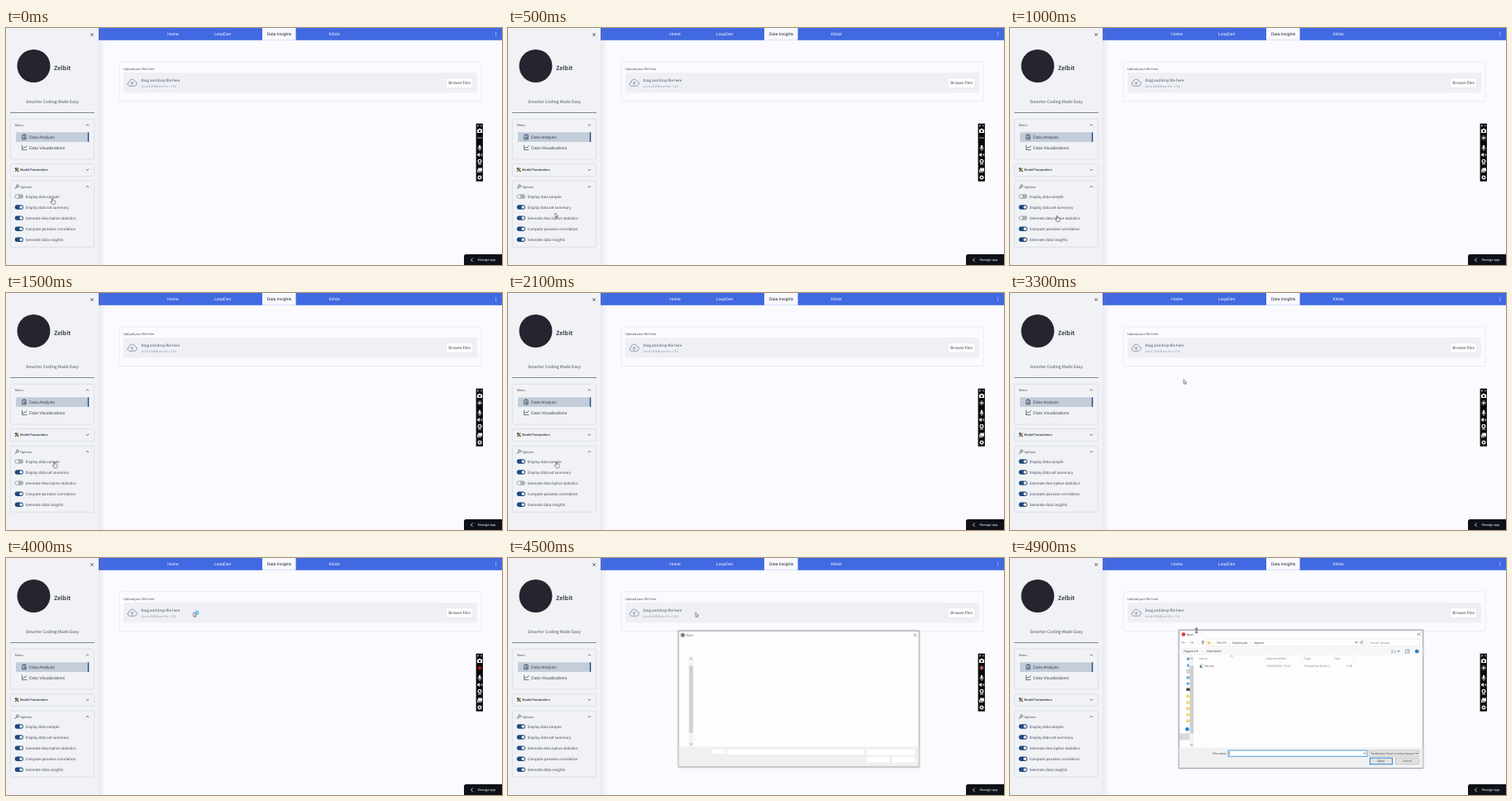
Recreate the animation shown at these times as an HTML page. Size 600x287 px, loop 5 s.

```html
<!DOCTYPE html>
<html lang="en">
<head>
<meta charset="utf-8">
<title>Data insights</title>
<style>
html, body { margin: 0; width: 100%; height: 100%; overflow: hidden; background: #fbfbff; }
svg { display: block; width: 100%; height: 100%; }
text { text-rendering: geometricPrecision; fill: #41444f; }
.ui { font-family: "Noto Sans CJK JP", "Noto Sans CJK SC", Lato, sans-serif; font-size: 4.42px; }
.sm { font-size: 3.85px; }
.nav { font-family: "Liberation Sans", Arial, sans-serif; font-size: 5.1px; }
.nav text { text-anchor: middle; }
.win { font-family: "Open Sans", "Noto Sans", sans-serif; font-size: 3.5px; }
.win text { fill: #333; }
.win .dim { fill: #777; }
.line { fill: none; stroke-linecap: round; stroke-linejoin: round; }
.card { fill: none; stroke: #d6d9e1; stroke-width: .7; }
.dialog { transform-origin: 333px 145px; }

.anim, .show { animation: 5s step-end infinite; }
.cursor { animation-name: move; }
.hand { animation-name: hand; }
.arrow { animation-name: arrow; }
.busy { animation-name: busy; }
.resize { animation-name: resize; }
.sampleOff { animation-name: sampleOff; }
.statsOff { animation-name: statsOff; }
.dots { animation-name: dots; }
.rec { animation-name: rec; }
.dialog { animation-name: open; }
.blank { animation-name: blank; }
.loaded { animation-name: loaded; }

@keyframes move {
  0% { transform: translate(56px, 206px); animation-timing-function: steps(5); }
  10% { transform: translate(57px, 224px); animation-timing-function: steps(3); }
  16%, 20% { transform: translate(57px, 227px); }
  20% { animation-timing-function: steps(4); }
  28%, 34% { transform: translate(58.5px, 204.3px); }
  34% { animation-timing-function: steps(6); }
  46%, 50% { transform: translate(58px, 228px); }
  50% { animation-timing-function: steps(3); }
  56% { transform: translate(152.5px, 227px); animation-timing-function: steps(2); }
  60% { transform: translate(185px, 163px); animation-timing-function: steps(5); }
  70%, 92% { transform: translate(226.7px, 65.7px); }
  92% { animation-timing-function: steps(3); }
  98%, 100% { transform: translate(225.5px, 84.5px); }
}
@keyframes hand { 0% { opacity: 1; } 6% { opacity: 0; } 12% { opacity: 1; } 58%, 100% { opacity: 0; } }
@keyframes arrow { 0% { opacity: 0; } 6% { opacity: 1; } 12% { opacity: 0; } 58% { opacity: 1; } 96%, 100% { opacity: 0; } }
@keyframes busy { 0% { opacity: 0; } 76% { opacity: 1; } 88%, 100% { opacity: 0; } }
@keyframes resize { 0% { opacity: 0; } 96%, 100% { opacity: 1; } }
@keyframes sampleOff { 0% { opacity: 1; } 32%, 100% { opacity: 0; } }
@keyframes statsOff { 0% { opacity: 0; } 18% { opacity: 1; } 50%, 100% { opacity: 0; } }
@keyframes dots { 0% { opacity: 1; } 14%, 100% { opacity: 0; } }
@keyframes rec {
  0% { opacity: 0; color: #e4e4e4; }
  14% { opacity: 1; color: #e4e4e4; }
  76% { opacity: 1; color: #e02028; }
  84% { opacity: 1; color: #e02028; animation-timing-function: steps(6); }
  96%, 100% { opacity: 1; color: #e4e4e4; }
}
@keyframes open {
  0% { opacity: 0; transform: scale(.986); }
  90% { opacity: 1; transform: scale(.986); }
  92%, 100% { opacity: 1; transform: none; }
}
@keyframes blank { 0% { opacity: 1; } 94%, 100% { opacity: 0; } }
@keyframes loaded { 0% { opacity: 0; } 94%, 100% { opacity: 1; } }
</style>
</head>
<body>
<svg viewBox="0 0 600 287" preserveAspectRatio="none">
  <defs>
    <linearGradient id="shade">
      <stop stop-color="#7a7f95" stop-opacity=".14"/>
      <stop offset="1" stop-color="#7a7f95" stop-opacity="0"/>
    </linearGradient>
    <path id="up" class="line" d="M-1.3 .7L0 -.6L1.3 .7" stroke="#41444f" stroke-width=".8"/>
    <path id="down" class="line" d="M-1.3 -.7L0 .6L1.3 -.7" stroke="#41444f" stroke-width=".8"/>
    <path id="cross" class="line" d="M-1.4 -1.4L1.4 1.4M-1.4 1.4L1.4 -1.4"/>
    <g id="on">
      <rect x="10.7" y="-2.7" width="10.2" height="5.4" rx="2.7" fill="#1f4a7d"/>
      <circle cx="18.2" r="1.8" fill="#f4f6fa"/>
    </g>
    <g id="off">
      <rect x="10.4" y="-3" width="10.8" height="6" fill="#f0f2f6"/>
      <rect x="10.7" y="-2.7" width="10.2" height="5.4" rx="2.7" fill="#a9adb8"/>
      <circle cx="13.4" r="1.8" fill="#f4f6fa"/>
    </g>
    <path id="folder" d="M-2 -1.8h1.5l.6 .7h1.9v3h-4z" fill="#f7d36b"/>
    <path id="pointer" d="M0 0V5.3L1.3 4.2L2.1 6.1L2.9 5.7L2.1 3.9H3.7Z" fill="#fff" stroke="#222" stroke-width=".5"/>
  </defs>

  <rect width="600" height="287" fill="#fbfbff"/>

  <!-- Navigation -->
  <g class="nav">
    <rect x="112" width="488" height="14.8" fill="#4169e1"/>
    <rect x="310" width="40.6" height="14.8" fill="#f8f8ff"/>
    <text x="202" y="9.1" style="fill:#fff">Home</text>
    <text x="262" y="9.1" style="fill:#fff">LoopDen</text>
    <text x="330.5" y="9.1" style="fill:#222">Data Insights</text>
    <text x="397" y="9.1" style="fill:#fff">KitVat</text>
    <path class="line" d="M592.7 5.8v0m0 1.8v0m0 1.8v0" stroke="#fff" stroke-width="1"/>
  </g>

  <!-- Sidebar -->
  <rect x="112" width="9" height="287" fill="url(#shade)"/>
  <rect width="112" height="287" fill="#f0f2f6"/>
  <use href="#cross" x="104.2" y="8" stroke="#31333f" stroke-width=".8"/>
  <circle cx="33.5" cy="46" r="20" fill="#25252f"/>
  <g class="ui">
    <text x="58" y="51" font-size="7.1" font-weight="700">Zelbit</text>
    <text x="56" y="90.7" font-size="4.9" font-weight="700" text-anchor="middle" style="fill:#7b7e89">Smarter Coding Made Easy</text>
    <path d="M5 102.5H107" stroke="#84878f" stroke-width="1"/>

    <rect class="card" x="5.3" y="110.3" width="101.4" height="48.7" rx="2"/>
    <text class="sm" x="10.8" y="119">Menu</text>
    <use href="#up" x="98.5" y="117.3"/>
    <rect x="12" y="126.3" width="88" height="11.6" fill="#c3ccd9"/>
    <rect x="98.9" y="126.3" width="1.4" height="11.6" fill="#1f4a7d"/>
    <g class="line" stroke="#31435c" stroke-width=".7">
      <path d="M20 129.7h4.2v5.3h-4.2zM21.2 129.7v-.8h1.8v.8M21.2 133.7v-1M22.2 133.7v-2.2M23.2 133.7v-1.5"/>
      <path d="M19.5 142.2v5.3h5.5M20.6 145.8l1.5-1.8l1.2 1l1.7-2.3"/>
    </g>
    <g class="nav">
      <text x="28" y="133.9" style="text-anchor:start">Data Analysis</text>
      <text x="28" y="146.8" style="text-anchor:start">Data Visualizations</text>
    </g>

    <rect class="card" x="5.3" y="164.5" width="101.4" height="15" rx="2"/>
    <path class="line" d="M11.6 170l3.4 3.6M11.2 170.6l1.2-1.2" stroke="#444" stroke-width="1.3"/>
    <path class="line" d="M14.8 170l-3.4 3.6" stroke="#9a7040" stroke-width="1.4"/>
    <text x="17" y="173.4" font-size="3.8" font-weight="700">Model Parameters</text>
    <use href="#down" x="98.5" y="171.9"/>

    <rect class="card" x="5.3" y="185" width="101.4" height="80.3" rx="2"/>
    <path class="line" d="M11.2 194.4l1.7-1.8" stroke="#444" stroke-width="1"/>
    <circle cx="14" cy="191.4" r="1.5" fill="#c8dcec" stroke="#444" stroke-width=".6"/>
    <text class="sm" x="17" y="193.6">Options</text>
    <use href="#up" x="98.5" y="192"/>

    <use href="#on" y="204"/><text x="23.4" y="205.6">Display data sample</text>
    <use href="#on" y="217"/><text x="23.4" y="218.7">Display data set summary</text>
    <use href="#on" y="230.1"/><text x="23.4" y="231.8">Generate descriptive statistics</text>
    <use href="#on" y="243.2"/><text x="23.4" y="244.9">Compute pairwise correlation</text>
    <use href="#on" y="256.3"/><text x="23.4" y="258">Generate data insights</text>
    <g class="show sampleOff"><use href="#off" y="204"/></g>
    <g class="show statsOff"><use href="#off" y="230.1"/></g>
  </g>

  <!-- Uploader -->
  <g class="ui">
    <rect class="card" x="137" y="40.8" width="438" height="47.8" rx="2" style="stroke:#e3e5ec"/>
    <text class="sm" x="142" y="50.7">Upload your file here</text>
    <rect x="142" y="54" width="428" height="24.6" rx="2" fill="#eef0f6"/>
    <g class="line" stroke="#8a8f9f" stroke-width=".9">
      <path d="M149.6 70.2C146.3 70 146.3 65.8 149.2 65.5C149.4 61.3 155 61.2 155.7 64.5C159.3 64.6 159.3 70 155.8 70.2Z"/>
      <path d="M152.6 68.6V65.8M151.2 67l1.4-1.4l1.4 1.4"/>
    </g>
    <text x="163.4" y="64.8">Drag and drop file here</text>
    <text x="163.4" y="72.4" font-size="3.6" style="fill:#9699a4">Limit 200MB per file • CSV</text>
    <rect x="532.3" y="60.4" width="32.6" height="12.2" rx="1.8" fill="#fff" stroke="#dcdfe6" stroke-width=".6"/>
    <text x="548.6" y="68.2" font-size="4.8" text-anchor="middle">Browse files</text>
  </g>

  <!-- Manage app -->
  <path d="M554 287V276.5Q554 274 556.5 274H600V287Z" fill="#0e1117"/>
  <path class="line" d="M564.3 278.9l-1.8 1.9l1.8 1.9" stroke="#fff" stroke-width=".8"/>
  <text class="ui" x="570.5" y="282.4" style="fill:#fff;font-size:3.85px">Manage app</text>

  <!-- File dialog -->
  <g class="win anim dialog">
    <rect x="204.3" y="87.3" width="295.4" height="167" fill="#fdfdfd" stroke="#8a8a8a" stroke-width=".7" style="filter:drop-shadow(0 .6px 1.2px #0005)"/>
    <rect x="204.7" y="229.6" width="294.6" height="24.4" fill="#f0f0f0"/>
    <text x="213.6" y="93.9">Open</text>
    <use href="#cross" x="494.6" y="92.4" stroke="#444" stroke-width=".55"/>
    <rect x="217.3" y="118" width="5" height="111" fill="#f3f3f3"/>
    <rect x="217.5" y="130.5" width="4.6" height="82" fill="#cfcfcf"/>
    <use href="#up" x="219.8" y="121.5" opacity=".7"/>
    <use href="#down" x="219.8" y="226.5" opacity=".7"/>

    <g class="show blank">
      <circle cx="209.6" cy="92.6" r="2.5" fill="#777"/>
      <path d="M244.5 232.8h17.5v6h-17.5zM263.5 232.5h168.5v7.5h-168.5zM435 232.5h60v7.5h-60zM435 241.5h29v8h-29zM466 241.5h29v8h-29z" fill="#fff" stroke="#e2e2e2" stroke-width=".4"/>
    </g>

    <g class="show loaded">
      <circle cx="209.9" cy="92.5" r="2.3" fill="#d93b30"/>
      <g class="line" stroke="#999" stroke-width=".6">
        <path d="M212 102.5h-4m1.5-1.5l-1.5 1.5l1.5 1.5M217.5 102.5h4m-1.5-1.5l1.5 1.5l-1.5 1.5"/>
        <path d="M233.3 104.5v-4m-1.5 1.5l1.5-1.5l1.5 1.5" stroke="#333"/>
      </g>
      <path d="M237.5 98.2h192.5v8.6h-192.5zM433 98.2h62.5v8.6h-62.5z" fill="#fff" stroke="#d9d9d9" stroke-width=".5"/>
      <use href="#folder" x="241" y="102.5"/>
      <text x="245.5" y="103.7">›</text><text x="250" y="103.7">This PC</text>
      <text x="265" y="103.7">›</text><text x="269" y="103.7">Downloads</text>
      <text x="290.5" y="103.7">›</text><text x="295" y="103.7">dataset</text>
      <use href="#down" x="419" y="102.5"/>
      <path class="line" d="M426.7 101.6a1.6 1.6 0 1 0 .2 1.4m-.1-2.5v1.2h-1.2" stroke="#555" stroke-width=".5"/>
      <text class="dim" x="435.5" y="103.7">Search dataset</text>

      <rect x="204.7" y="108.5" width="294.6" height="9.2" fill="#f5f6f7"/>
      <text x="210" y="114.4">Organise ▾</text>
      <text x="238" y="114.4">New folder</text>
      <path d="M461.5 111.5h1.4v1.2h-1.4zm0 2.2h1.4v1.2h-1.4zm2.4-2h3v.6h-3zm0 2.3h3v.6h-3z" fill="#6890ba"/>
      <use href="#down" x="470" y="113"/>
      <path d="M478.5 111h4.5v4h-4.5zM481.3 111v4" fill="#fff" stroke="#567" stroke-width=".5"/>
      <circle cx="492.2" cy="113" r="2.3" fill="#1573c4"/>
      <text x="492.2" y="114.3" text-anchor="middle" style="fill:#fff">?</text>

      <g fill="#4a94df">
        <path d="M215.5 119.8l.7 1.5l1.6 .2l-1.2 1.1l.3 1.6l-1.4-.8l-1.4 .8l.3-1.6l-1.2-1.1l1.6-.2z"/>
        <path d="M214.7 128h1.6v2h1.2l-2 2.2l-2-2.2h1.2z"/>
        <path d="M213.8 135.3h3.2v4h-3.2z" fill="#dfe7ef" stroke="#789" stroke-width=".4"/>
        <path d="M213.3 143.2h4.2v3.4h-4.2z" fill="#7fb7db"/>
        <circle cx="215.2" cy="152" r="1.6"/>
        <path d="M213.3 157.5h4.2v3.4h-4.2z" fill="#444"/>
        <circle cx="214.4" cy="207.3" r="2.2" fill="#2478cc"/>
      </g>
      <use href="#folder" x="215.4" y="167"/>
      <use href="#folder" x="215.4" y="174.5"/>
      <use href="#folder" x="215.4" y="182"/>
      <use href="#folder" x="215.4" y="189.5"/>
      <use href="#folder" x="215.4" y="197"/>
      <rect x="205" y="212.5" width="12.2" height="8" fill="#d9d9d9"/>

      <path d="M308 119v7M354 119v7M391 119v7M416 119v7" stroke="#e2e2e2" stroke-width=".5"/>
      <use href="#up" x="268" y="118.8" opacity=".5"/>
      <text class="dim" x="229" y="123.4">Name</text>
      <text class="dim" x="310.5" y="123.4">Date modified</text>
      <text class="dim" x="356" y="123.4">Type</text>
      <text class="dim" x="393" y="123.4">Size</text>
      <path d="M230.3 128.8h3.2v4.4h-3.2z" fill="#fff" stroke="#888" stroke-width=".4"/>
      <rect x="229.6" y="130.2" width="2.4" height="2.3" fill="#2f8a57"/>
      <text x="236" y="132.3">bis.csv</text>
      <text class="dim" x="310.5" y="132.3">10/05/2024 15:24</text>
      <text class="dim" x="356" y="132.3" font-size="3.4">Tamberlow Sheet C...</text>
      <text class="dim" x="414" y="132.3" text-anchor="end">1 KB</text>

      <text x="262" y="238" text-anchor="end">File name:</text>
      <rect x="264" y="233" width="168" height="7.2" fill="#fff" stroke="#0078d7" stroke-width=".7"/>
      <path d="M265.6 234.3v4.6" stroke="#222" stroke-width=".4"/>
      <use href="#down" x="429" y="236.7"/>
      <rect x="434.8" y="233" width="59.5" height="7.2" fill="#e4e4e4" stroke="#aaa" stroke-width=".5"/>
      <text x="436.3" y="238" font-size="3.4">Tamberlow Sheet Comma Separa</text>
      <use href="#down" x="491.8" y="236.7"/>
      <rect x="435.5" y="242.2" width="27" height="7.6" fill="#e1e1e1" stroke="#0078d7" stroke-width=".8"/>
      <rect x="466.3" y="242.2" width="28" height="7.6" fill="#e1e1e1" stroke="#aaa" stroke-width=".5"/>
      <text x="449" y="247.3" text-anchor="middle">Open</text>
      <text x="480.3" y="247.3" text-anchor="middle">Cancel</text>
    </g>
  </g>

  <!-- Recorder strip -->
  <rect x="568.6" y="115.7" width="8.3" height="70" fill="#080808"/>
  <g fill="#f2f2f2">
    <path d="M570.2 117.4h1.8v.9h-.9v1.2h-.9zM574 118h1.8v.8h-1.8z"/>
    <path d="M569.9 122.7h1.6l.6-1h1.8l.6 1h1.6v4.4h-6.2z"/>
    <circle cx="573" cy="124.8" r="1.2" fill="#080808"/>
    <rect x="571.8" y="141.7" width="2.4" height="4.4" rx="1.2"/>
    <path d="M570 152.6h1.3l1.7-1.5v5l-1.7-1.5h-1.3z"/>
    <circle cx="573" cy="161.3" r="2.5"/>
    <circle cx="573" cy="161.3" r="1.2" fill="#080808"/>
    <path d="M571 164.4h4v1h-4z"/>
    <path d="M571.2 169.4h4.8v4.2h-4.8zM570 171h.8v3.3h4v.8h-4.8z"/>
  </g>
  <g class="line" stroke="#f2f2f2">
    <path d="M570.8 144.9q0 2.4 2.2 2.4t2.2-2.4M573 147.3v1.2M574.2 152.5l1.8 2.1m0-2.1l-1.8 2.1" stroke-width=".7"/>
    <circle cx="573" cy="181" r="1.7" stroke-width="1.3"/>
    <circle cx="573" cy="181" r="2.6" stroke-width=".8" stroke-dasharray=".8 1.24" stroke-linecap="butt"/>
  </g>
  <g class="show dots"><path class="line" d="M571 133v0m2 0v0m2 0v0" stroke="#f2f2f2" stroke-width="1.3"/></g>
  <g class="show rec" fill="currentColor" stroke="currentColor">
    <circle cx="573" cy="133" r="1.6" stroke="none"/>
    <circle cx="573" cy="133" r="2.5" fill="none" stroke-width=".8" stroke-dasharray="1 .96"/>
  </g>

  <!-- Mouse -->
  <g class="anim cursor">
    <path class="show hand" d="M-.5 .6Q0 -.4 .6 .6V2.8Q1.3 2.4 1.6 3Q2.3 2.6 2.7 3.3Q3.5 3.2 3.6 4V5.4Q3.4 6.5 2.9 7.4H-.2L-2.2 4.7Q-2.1 3.6 -.5 4.7Z" fill="#fff" stroke="#222" stroke-width=".55"/>
    <g class="show arrow"><use href="#pointer"/></g>
    <g class="show busy">
      <circle cx="4.2" cy=".4" r="1.7" fill="#e8f5ff" stroke="#2391d4" stroke-width="1.1"/>
    </g>
    <path class="show resize line" d="M0 .3V6.5M-1.2 1.6L0 .2L1.2 1.6M-1.2 5.2L0 6.6L1.2 5.2" stroke="#222" stroke-width=".8"/>
  </g>
</svg>
</body>
</html>
```
